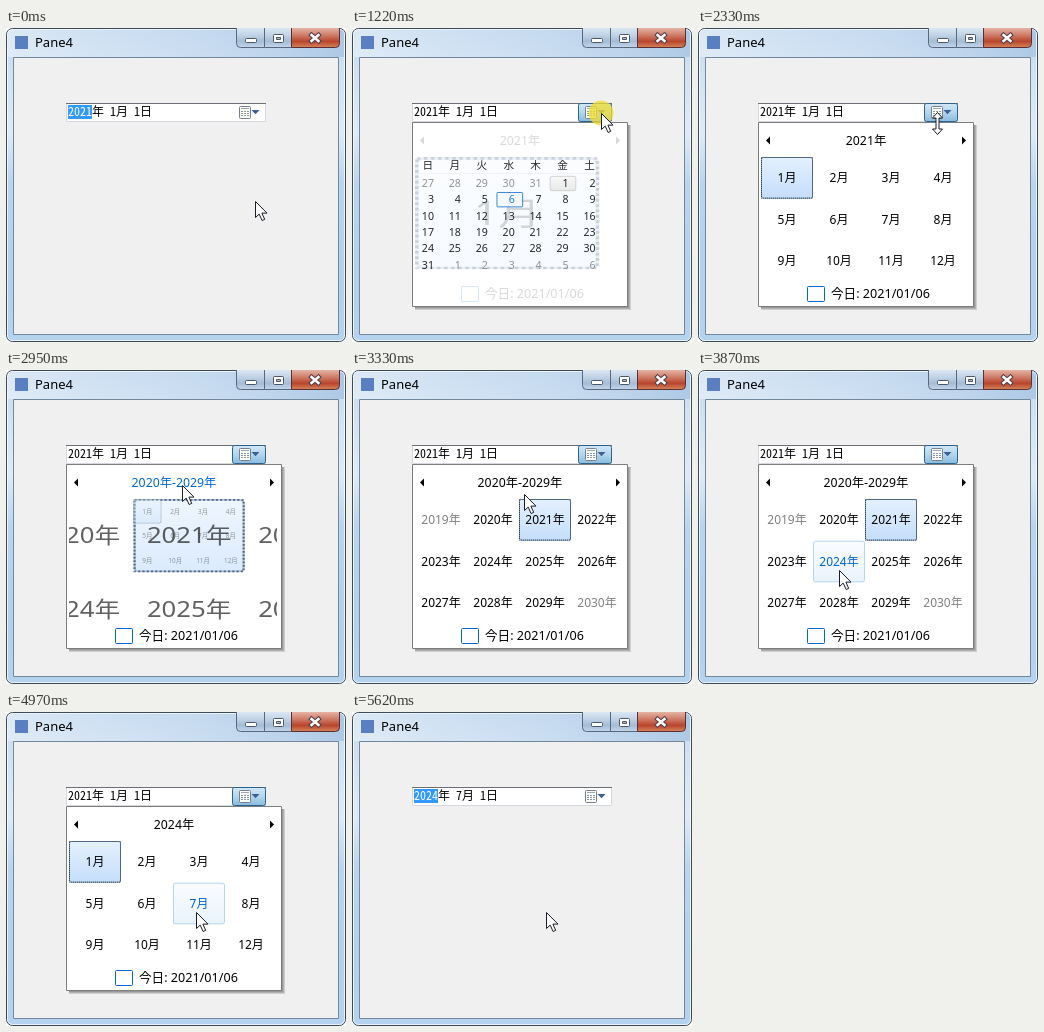
Animation, 340 px wide and 314 px high, one loop 6.67 s. Source, as an HTML page with a canvas:

```html
<!DOCTYPE html>
<html lang="ja">
<head>
<meta charset="utf-8">
<style>
html, body { margin: 0; width: 340px; height: 314px; overflow: hidden; background: #fff; }
canvas { display: block; }
</style>
</head>
<body>
<canvas id="stage" width="340" height="314"></canvas>
<script>
const g = document.getElementById('stage').getContext('2d');
const LOOP = 6670, ZOOM = 250;
const UI = '"Noto Sans", "Noto Sans CJK JP", sans-serif';
const GOTHIC = '"Noto Sans Mono CJK JP", "Noto Sans CJK JP", monospace';
const BLUE = '#0066cc';

// The screen only refreshes at these times.
const ticks = [0, 450, 530, 610, 690, 770, 860, 1220, 1320, 1390, 1470, 1550,
  2330, 2400, 2480, 2560, 2640, 2710, 2790, 2870, 2950, 3030, 3100,
  3330, 3410, 3480, 3560, 3640, 3870, 3970, 4120, 4200, 4280, 4350,
  4650, 4730, 4810, 4880, 4960, 5040, 5520, 5620];
// Pointer stops: time, x, y
const stops = [[370, 249, 173], [860, 249, 85], [2250, 249, 85], [2330, 239, 95],
  [2710, 176, 115], [3250, 176, 115], [3640, 141, 200], [3870, 141, 200],
  [3970, 139, 199], [4570, 139, 199], [5040, 194, 200]];
const clicks = [[1220, 1390], [2790, 2870], [3970, 4120], [5520, 5620]];

const view = [63, 129, 208, 125];
const cell = i => [63 + 52 * (i % 4), 129 + 125 / 3 * Math.floor(i / 4), 52, 125 / 3];
const months = Array.from({ length: 12 }, (_, i) => `${i + 1}月`);
const years = Array.from({ length: 12 }, (_, i) => `${2019 + i}年`);

const clamp = v => Math.max(0, Math.min(1, v));
const mix = (a, b, k) => a + (b - a) * k;

function pointer(t) {
  const n = stops.findIndex(s => s[0] > t);
  if (n < 0) return stops.at(-1).slice(1);
  if (n === 0) return stops[0].slice(1);
  const [a, b] = [stops[n - 1], stops[n]];
  let k = (t - a[0]) / (b[0] - a[0]);
  k = k * k * (3 - 2 * k);
  return [mix(a[1], b[1], k), mix(a[2], b[2], k)];
}

function fade(y, h, ...colors) {
  const f = g.createLinearGradient(0, y, 0, y + h);
  colors.forEach((c, i) => f.addColorStop(i / (colors.length - 1), c));
  return f;
}

function box(x, y, w, h, fill, stroke, r = 0) {
  g.beginPath();
  g.roundRect(x + .5, y + .5, w - 1, h - 1, r);
  if (fill) { g.fillStyle = fill; g.fill(); }
  if (stroke) { g.strokeStyle = stroke; g.lineWidth = 1; g.stroke(); }
}

function rect(x, y, w, h, color) {
  g.fillStyle = color;
  g.fillRect(x, y, w, h);
}

function poly(points, fill, stroke) {
  g.beginPath();
  points.forEach(p => g.lineTo(...p));
  g.closePath();
  g.fillStyle = fill;
  g.fill();
  if (stroke) { g.strokeStyle = stroke; g.lineWidth = 1; g.stroke(); }
}

// y is the vertical middle of the digits
function text(s, x, y, color = '#000', align = 'center', size = 12) {
  g.font = `${size}px ${UI}`;
  g.textAlign = align;
  g.fillStyle = color;
  g.fillText(s, x, y + 4.3);
}

function drawWindow() {
  box(0, 0, 340, 314, fade(0, 314, '#c3d8ee', '#d3e3f3', '#dfeaf6', '#b9d4ef', '#b4d2ef', '#b1d1ee', '#b5d3ef'), '#3d4a58', 6);
  const shine = g.createLinearGradient(0, 0, 340, 0);
  shine.addColorStop(0, 'rgba(255,255,255,.4)');
  shine.addColorStop(.4, 'rgba(220,235,250,.25)');
  shine.addColorStop(1, 'rgba(145,180,218,.5)');
  rect(2, 2, 336, 27, shine);
  box(1, 1, 338, 312, null, 'rgba(255,255,255,.7)', 5);
  box(7, 29, 326, 278, '#f0f0f0', '#73879c');

  rect(9, 8, 13, 13, '#5a7fc0');
  text('Pane4', 29, 14.5, '#000', 'left', 13);

  const frame = '#58697d';
  box(230, -3, 29, 23, fade(0, 20, '#dbe7f3', '#c3d4e6', '#a5bcd5', '#c5d9ed'), frame, [0, 0, 0, 4]);
  box(258, -3, 28, 23, fade(0, 20, '#dbe7f3', '#c3d4e6', '#a5bcd5', '#c5d9ed'), frame);
  box(285, -3, 49, 23, fade(0, 20, '#e5b3a5', '#d0806c', '#b9452c', '#d68a60'), '#5a3034', [0, 0, 4, 0]);
  box(239, 10, 12, 5, '#fff', '#4b5767', 1);
  box(267, 6, 11, 9, '#fff', '#4b5767', 1);
  box(270, 9, 5, 3, '#a9bdd3', '#4b5767');
  g.lineCap = 'square';
  for (const [color, width] of [['#55404a', 4.6], ['#fff', 2.4]]) {
    g.strokeStyle = color;
    g.lineWidth = width;
    g.beginPath();
    g.moveTo(305.5, 7); g.lineTo(312.5, 13);
    g.moveTo(312.5, 7); g.lineTo(305.5, 13);
    g.stroke();
  }
  g.lineCap = 'butt';
}

function drawPicker(value, selected, state) {
  box(60, 75, 200, 19, '#fff', '#d5d8df');
  rect(60, 75, 200, 1, '#6c7076');
  if (selected) rect(62, 77, 24, 14, '#3399ff');
  g.font = `12px ${GOTHIC}`;
  g.textAlign = 'left';
  let x = 62;
  [...value].forEach((c, i) => {
    g.fillStyle = selected && i < 4 ? '#fff' : '#000';
    g.fillText(c, x, 88);
    x += c > '~' ? 12 : 6;
  });
  if (state === 'hot') box(226, 75, 34, 19, fade(75, 19, '#eaf6fd', '#d5effc', '#a7d9f5'), '#3c7fb1', 2);
  if (state === 'down') box(226, 75, 34, 19, fade(75, 19, '#d3e8f6', '#b3d6ee', '#86b9dc'), '#2c628b', 2);
  box(233, 78, 12, 13, '#fbfbf6', '#77808c', 1);
  rect(235, 80, 8, 1, '#9ba6b6');
  for (let i = 0; i < 9; i++) rect(235 + i % 3 * 3, 83 + Math.floor(i / 3) * 2, 2, 1, '#8795a8');
  poly([[245.5, 82], [253.5, 82], [249.5, 86.3]], '#3f5f94');
}

function drawGrid(labels, selected, hover, edgesGrey) {
  labels.forEach((label, i) => {
    const [x, y, w, h] = cell(i);
    let color = edgesGrey && i % 11 === 0 ? '#808080' : '#000';
    if (i === selected) {
      box(x, y, w, h, fade(y, h, '#e4f0fe', '#c5defb'), '#7da2ce', 2);
      g.setLineDash([1, 1]);
      box(x, y, w, h, null, '#222c3c');
      g.setLineDash([]);
    } else if (i === hover) {
      box(x, y, w, h, fade(y, h, '#fbfcfe', '#e9f3fd'), '#b5d5f8', 2);
      color = BLUE;
    }
    text(label, x + w / 2, y + h / 2, color);
  });
}

function drawDays() {
  box(215, 150, 30, 17, fade(150, 17, '#f8f8f8', '#e4e4e4'), '#c6c6c6', 2);
  box(155, 168, 30, 17, '#f2f8fe', BLUE, 1);
  rect(67, 147, 200, 1, '#eeeeee');
  [...'日月火水木金土'].forEach((d, i) => text(d, 77.6 + i * 30.4, 138));
  for (let i = 0; i < 42; i++) {
    const day = i < 5 ? 27 + i : (i - 5) % 31 + 1;
    const color = i < 5 || i > 35 ? '#808080' : day === 6 ? BLUE : '#000';
    text(day, 84.4 + i % 7 * 30.4, 158 + Math.floor(i / 7) * 18.2, color, 'right');
  }
}

// Inner view shrinks into one cell of the outer view as p goes from 0 to 1.
function drawZoom(inner, outer, target, p) {
  const to = cell(target);
  const now = view.map((v, i) => mix(v, to[i], p));
  const layer = (draw, from, alpha) => {
    if (!alpha) return;
    g.save();
    g.globalAlpha = alpha;
    g.translate(now[0], now[1]);
    g.scale(now[2] / from[2], now[3] / from[3]);
    g.translate(-from[0], -from[1]);
    draw();
    g.restore();
  };
  g.save();
  g.beginPath();
  g.rect(...view);
  g.clip();
  layer(outer, to, p);
  layer(inner, view, 1 - p);
  g.restore();
}

function drawPopup(t, x, y) {
  for (let i = 3; i > 0; i--) rect(63, 97, 213 + i, 182 + i, 'rgba(0,0,0,.14)');
  box(60, 94, 216, 185, '#fff', '#7d7d7d');

  const col = Math.floor((x - 63) / 52), row = Math.floor((y - 129) / (125 / 3));
  const hover = row >= 0 ? row * 4 + col : -1;
  const progress = start => clamp((t - start) / ZOOM);
  const monthGrid = () => drawGrid(months, 0, hover);
  const yearGrid = selected => () => drawGrid(years, selected, hover, true);
  let title = '2021年', shown = 1;
  if (t < 2795) {
    shown = progress(1182);
    drawZoom(drawDays, monthGrid, 0, shown);
  } else if (t < 4060) {
    title = '2020年-2029年';
    drawZoom(monthGrid, yearGrid(2), 2, progress(2795));
  } else {
    title = '2024年';
    drawZoom(monthGrid, yearGrid(5), 5, 1 - progress(4060));
  }

  g.globalAlpha = shown;
  const onTitle = Math.abs(x - 168) < 42 && y > 104 && y < 122;
  text(title, 168, 112.5, onTitle ? BLUE : '#000', 'center', 12.3);
  poly([[72, 108.5], [72, 116.5], [68, 112.5]], '#000');
  poly([[264, 108.5], [264, 116.5], [268, 112.5]], '#000');
  box(109, 258, 18, 16, '#fff', BLUE, 1);
  text('今日: 2021/01/06', 133, 266, '#000', 'left', 12.6);
  g.globalAlpha = 1;
}

function drawPointer(x, y, resizing) {
  const shape = resizing
    ? [[0, -11], [5, -5.5], [1.5, -5.5], [1.5, 5.5], [5, 5.5], [0, 11], [-5, 5.5], [-1.5, 5.5], [-1.5, -5.5], [-5, -5.5]]
    : [[0, 0], [0, 16], [3.7, 12.6], [6.6, 19], [9.2, 17.9], [6.4, 11.6], [11.5, 11.6]];
  poly(shape.map(([a, b]) => [x + a + .5, y + b + .5]), '#fff', '#1c1c28');
}

function render(now) {
  const time = now % LOOP;
  const t = ticks.findLast(v => v <= time);
  const [x, y] = pointer(t);
  const open = t >= 1220 && t < 5620;
  const over = x > 226 && x < 260 && y > 75 && y < 94;

  g.clearRect(0, 0, 340, 314);
  drawWindow();
  drawPicker(t < 5620 ? '2021年 1月 1日' : '2024年 7月 1日', !open, open ? 'down' : over ? 'hot' : '');
  if (open) drawPopup(t, x, y);
  if (clicks.some(([a, b]) => t >= a && t < b)) {
    g.fillStyle = 'rgba(238,222,50,.78)';
    g.beginPath();
    g.arc(x, y, 12.5, 0, 7);
    g.fill();
  }
  drawPointer(Math.round(x), Math.round(y), t === 2330);
}

const begin = performance.now();
function loop() {
  render(performance.now() - begin);
  requestAnimationFrame(loop);
}
loop();
</script>
</body>
</html>
```
